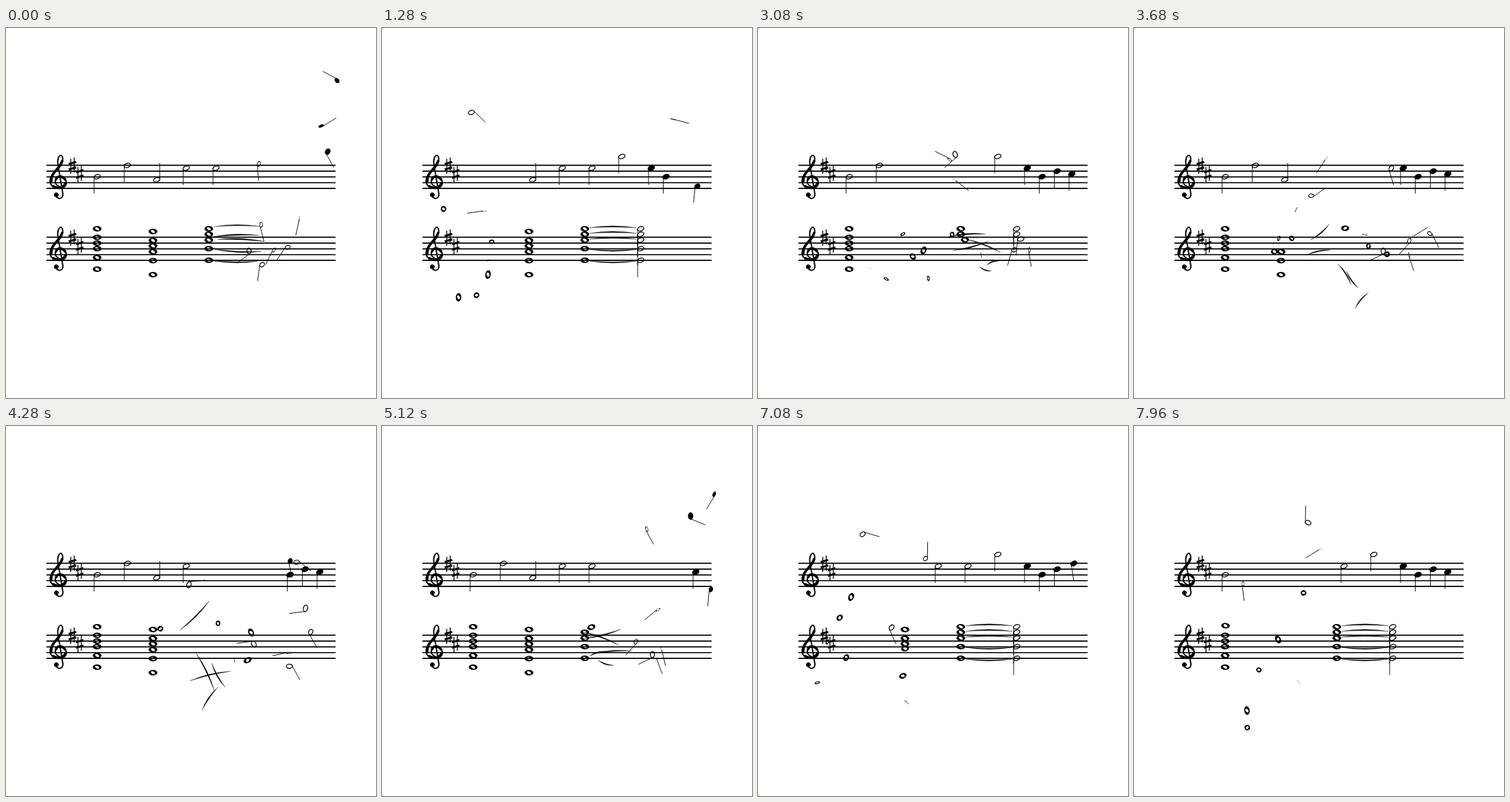
Write an HTML page that moves like this. It is 540 px wide and 540 px high and loops after 8 s.

```html
<!DOCTYPE html>
<html lang="en">
<head>
<meta charset="utf-8">
<title>Flying notes</title>
<style>
html, body { margin: 0; width: 100%; height: 100%; overflow: hidden; background: #fff; }
svg { display: block; width: 100vw; height: 100vh; }
.stem { stroke: #000; stroke-width: .9; vector-effect: non-scaling-stroke; }
.half { fill: none; stroke: #000; stroke-width: 1.3; }
</style>
</head>
<body>
<svg id="stage" viewBox="0 0 540 540">
  <defs>
    <g id="clef" fill="none" stroke="#000" stroke-linecap="round">
      <path stroke-width="1.9" d="M73 244C74 251 84 250 83 242L76 200C74 190 79 184 81 186C85 191 82 200 75 206C66 213 62 222 66 229C71 237 88 236 88 226C88 216 76 214 73 220C70 226 74 230 77 231"/>
      <path stroke-width="3.6" d="M82 194C79 205 65 211 66 224M69 231C75 235 85 233 87 226M73 221C74 216 82 215 86 221"/>
      <circle cx="73.5" cy="243.5" r="3" fill="#000"/>
    </g>
    <g id="sharp" stroke="#000" fill="none">
      <path stroke-width="1.3" d="M-2.5 -10V12M2.5 -12V10"/>
      <path stroke-width="3" d="M-5.5 -2.5L5.5 -5.5M-5.5 5.5L5.5 2.5"/>
    </g>
  </defs>
</svg>
<script>
const NS = 'http://www.w3.org/2000/svg';
const stage = document.getElementById('stage');
const LOOP = 8000, STEP = 40, BEAT = 1000 / 3, PERIOD = 16 * BEAT, START = 150;
const STAGGER = 100, LINE_GAP = 8.45;
const parts = [];

let seed = 2024;
const rand = () => (seed = (seed * 16807) % 2147483647) / 2147483647;
const spread = r => (rand() * 2 - 1) * r;

function add(parent, tag, attrs) {
  const el = document.createElementNS(NS, tag);
  for (const k in attrs) el.setAttribute(k, attrs[k]);
  parent.appendChild(el);
  return el;
}

function drawStaff(dy) {
  const g = add(stage, 'g', { transform: `translate(0 ${dy})` });
  for (let i = 0; i < 5; i++) {
    add(g, 'path', { d: `M59 ${200.4 + i * LINE_GAP}H481`, stroke: '#000', 'stroke-width': 1.7 });
  }
  add(g, 'use', { href: '#clef' });
  add(g, 'use', { href: '#sharp', x: 97, y: 201 });
  add(g, 'use', { href: '#sharp', x: 107.5, y: 213 });
}

const shapes = {
  half(g, dir = 1) {
    add(g, 'ellipse', { class: 'half', rx: 4.8, ry: 3.1, transform: 'rotate(-20)' });
    add(g, 'path', { class: 'stem', d: `M${-4.4 * dir} 1V${24.5 * dir}` });
  },
  up(g) { shapes.half(g, -1); },
  quarter(g) {
    add(g, 'ellipse', { rx: 5.5, ry: 3.9, transform: 'rotate(-20)' });
    add(g, 'path', { class: 'stem', d: 'M-4 1V24.5' });
  },
  whole(g) {
    add(g, 'path', {
      'fill-rule': 'evenodd',
      d: 'M-6.4 0A6.4 4 0 0 1 6.4 0A6.4 4 0 0 1 -6.4 0ZM-2.9 -1.4A3.3 2.6 25 0 1 2.9 1.4A3.3 2.6 25 0 1 -2.9 -1.4Z'
    });
  },
  tieOver(g, s = -1) {
    add(g, 'path', { d: `M-34 0Q0 ${5.5 * s} 34 0Q0 ${2.3 * s} -34 0Z`, stroke: '#000', 'stroke-width': .3 });
  },
  tieUnder(g) { shapes.tieOver(g, 1); }
};

// Every part leaves home when it sounds, tumbles round a curved loop and lands again.
function addPart(shape, x, y, beat, { dur = 2000, delay = 0, reach, swing = 130 } = {}) {
  const el = add(stage, 'g', {});
  shapes[shape](el);
  const flights = [];
  for (let c = -1; c < 2; c++) {
    const [px, py] = reach || [spread(80), 30 + spread(85)];
    flights.push({
      from: START + c * PERIOD + beat * BEAT + delay,
      dur, px, py,
      curl: spread(.5),
      swing: spread(swing),
      turns: rand() < .5 ? 1 : 2
    });
  }
  parts.push({ el, x, y, flights });
}

// The lowest note of a chord goes first.
function addChord(shape, x, ys, beat, dur) {
  ys.forEach((y, i) => addPart(shape, x, y, beat, { dur, delay: (ys.length - 1 - i) * STAGGER }));
}

function poseAt(part, t) {
  const f = part.flights.find(f => t > f.from && t < f.from + f.dur);
  if (!f) return [part.x, part.y, 0, 1];
  const u = (t - f.from) / f.dur;
  const out = Math.sin(Math.PI * u), side = f.curl * Math.sin(2 * Math.PI * u);
  return [
    part.x + f.px * out - f.py * side,
    part.y + f.py * out + f.px * side,
    f.swing * out,
    Math.cos(2 * Math.PI * f.turns * u)
  ];
}

drawStaff(0);
drawStaff(105);

// Melody: shape, place, beat and the far point of the flight
const melody = (shape, x, y, beat, ...reach) => addPart(shape, x, y, beat, { reach });
melody('half', 133, 217, 0, -10, -95);
melody('half', 177, 200.5, 2, 10, 95);
melody('up', 220, 221.5, 4, 40, -80);
melody('half', 263, 204.5, 6, 25, -20);
melody('half', 306.5, 204.5, 8, -50, 40);
melody('half', 350, 187.5, 10, 75, -10);
melody('quarter', 393, 204.5, 12, 55, -75);
melody('quarter', 414.5, 217, 13, 55, -150);
melody('quarter', 436.5, 209, 14, 25, 85);
melody('quarter', 458, 213, 15, -10, -110);

const held = [293, 301, 309.5, 322, 339];
addChord('whole', 133, [293, 305.5, 314, 322, 335, 352], 0, 2000);
addChord('whole', 214.5, [297, 310, 318, 326.5, 339.5, 360], 4, 2000);
addChord('whole', 296, held, 8, 2000);
addChord('half', 377.5, held, 8, 8 * BEAT);

// Ties between the last two chords
held.forEach((y, i) => {
  const under = i > 2;
  addPart(under ? 'tieUnder' : 'tieOver', 337, y + (under ? 1.3 : -1.4), 8, { dur: 2550, swing: 70 });
});

function render(t) {
  for (const p of parts) {
    const [x, y, a, w] = poseAt(p, t);
    const pose = `translate(${x.toFixed(2)} ${y.toFixed(2)}) rotate(${a.toFixed(2)}) scale(${w.toFixed(3)} 1)`;
    p.el.setAttribute('transform', pose);
  }
}

const begin = performance.now();
function tick(now) {
  const t = Math.max(0, now - begin) % LOOP;
  render(Math.floor(t / STEP) * STEP);
  requestAnimationFrame(tick);
}
render(0);
requestAnimationFrame(tick);
</script>
</body>
</html>
```
